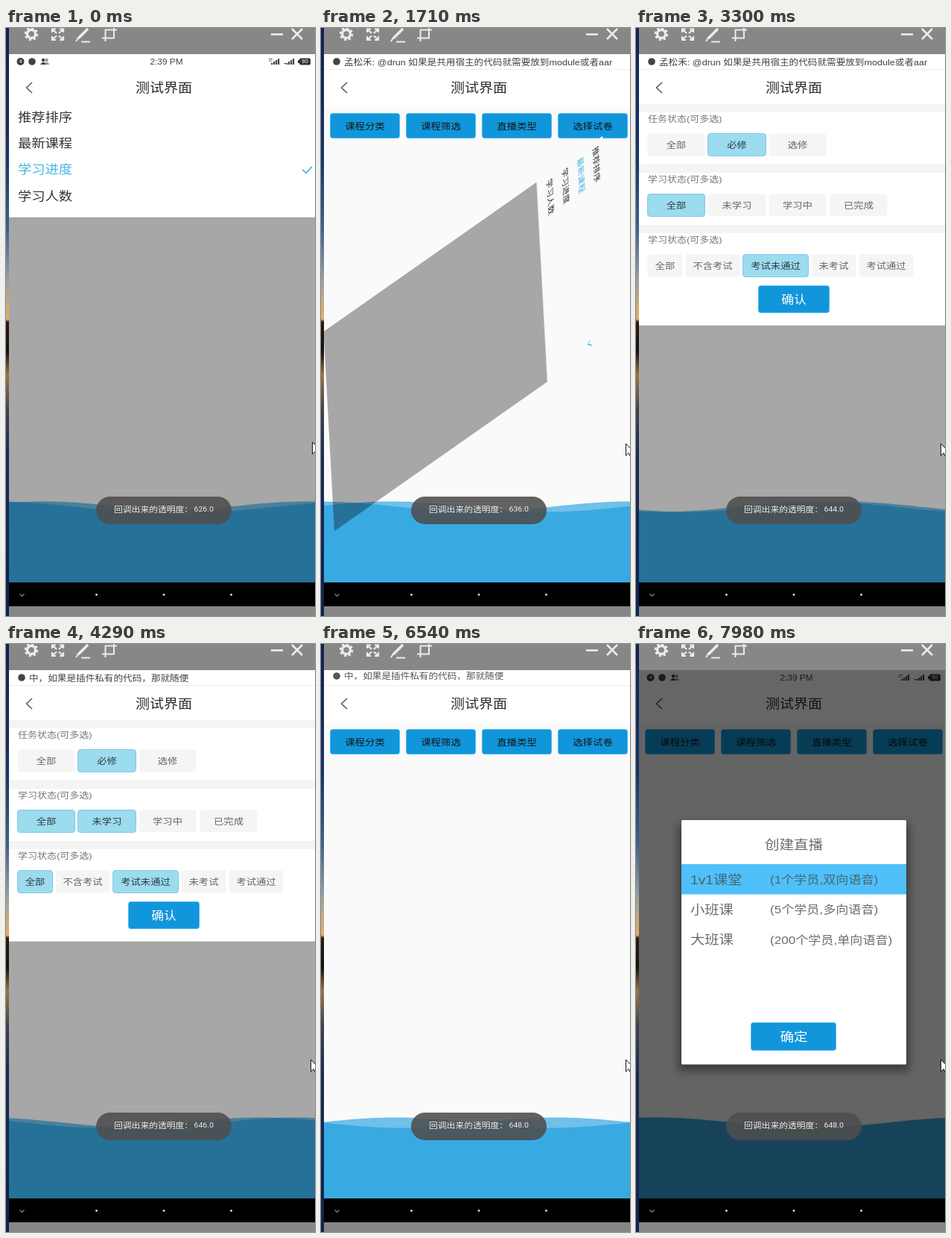
An HTML page for the animation above (8 s loop, 415 px wide and 788 px high).

```html
<!DOCTYPE html>
<html lang="zh">
<head>
<meta charset="utf-8">
<title>测试界面</title>
<style>
html, body { margin: 0; width: 100%; height: 100%; overflow: hidden; background: #878787; }
svg { display: block; width: 415px; height: 788px; }
text { font-family: "Liberation Sans", "Noto Sans CJK SC", "Noto Sans CJK", sans-serif; white-space: pre; }
</style>
</head>
<body>
<svg id="stage" viewBox="0 0 415 788">
  <defs>
    <linearGradient id="wall" x1="0" y1="0" x2="0" y2="1">
      <stop offset="0" stop-color="#0e2350"/>
      <stop offset=".22" stop-color="#17336b"/>
      <stop offset=".34" stop-color="#3f608f"/>
      <stop offset=".43" stop-color="#98a0a4"/>
      <stop offset=".495" stop-color="#e8ae62"/>
      <stop offset=".5" stop-color="#2a1c14"/>
      <stop offset=".55" stop-color="#15100f"/>
      <stop offset=".59" stop-color="#9a7640"/>
      <stop offset=".65" stop-color="#3f4152"/>
      <stop offset=".73" stop-color="#182b55"/>
      <stop offset="1" stop-color="#0e2350"/>
    </linearGradient>
    <clipPath id="screen"><rect x="4" y="35" width="411" height="708"/></clipPath>
    <clipPath id="bar"><rect x="4" y="35" width="411" height="20"/></clipPath>
    <filter id="soft" x="-20%" y="-20%" width="140%" height="140%"><feGaussianBlur stdDeviation="6"/></filter>
  </defs>
</svg>
<script>
const stage = document.getElementById('stage');
const BLUE = '#1296db';
const SQUASH = 0.88; // the mirrored screen is shown a little flattened

function add(parent, tag, attrs, label) {
  const node = document.createElementNS('http://www.w3.org/2000/svg', tag);
  for (const key in attrs) node.setAttribute(key, attrs[key]);
  if (label !== undefined) node.textContent = label;
  parent.appendChild(node);
  return node;
}
const group = (parent, attrs = {}) => add(parent, 'g', attrs);
const rect = (parent, x, y, x2, y2, fill, more = {}) =>
  add(parent, 'rect', { x, y, width: x2 - x, height: y2 - y, fill, ...more });
const line = (parent, d, stroke, width, more = {}) =>
  add(parent, 'path', { d, fill: 'none', stroke, 'stroke-width': width, ...more });
const dot = (parent, cx, cy, r, fill) => add(parent, 'circle', { cx, cy, r, fill });
const button = (parent, x, y, x2, y2) =>
  rect(parent, x + 0.5, y + 0.5, x2 - 0.5, y2 - 0.5, BLUE, { rx: 3, stroke: '#4db8ee' });
// y is the middle of the line
const text = (parent, x, y, size, fill, label, anchor = 'start') =>
  add(parent, 'text', {
    transform: `translate(${x} ${y + size * 0.365 * SQUASH}) scale(1 ${SQUASH})`,
    'font-size': size, fill, 'text-anchor': anchor
  }, label);

const clamp = v => Math.max(0, Math.min(1, v));
const span = (t, from, to) => clamp((t - from) / (to - from));
function along(table, t) {
  for (let i = 1; i < table.length; i++) {
    const [t0, a] = table[i - 1], [t1, b] = table[i];
    if (t <= t1) return a + (b - a) * (t - t0) / (t1 - t0);
  }
  return table[table.length - 1][1];
}
const show = (node, on) => node.setAttribute('display', on ? 'inline' : 'none');

// Window frame
rect(stage, 0, 0, 415, 788, '#878787');
rect(stage, 0, 0, 4, 788, 'url(#wall)');
const tools = group(stage, { stroke: '#ececec', fill: 'none' });
add(tools, 'circle', { cx: 34, cy: 8, r: 5.5, 'stroke-width': 3.4 });
add(tools, 'circle', { cx: 34, cy: 8, r: 8, 'stroke-width': 2.6, 'stroke-dasharray': '3.2 3.08' });
line(tools, 'M62 6V1.5H67M72 1.5H77V6M77 11V16H72M67 16H62V11M63 2.5L68 7M76 2.5L71 7M63 15L68 10.5M76 15L71 10.5', '#ececec', 2.2);
line(tools, 'M97 14L110 1', '#ececec', 3.6);
line(tools, 'M94 18L97 13M101 18.5H113', '#ececec', 2);
line(tools, 'M149 2.5H133.5V18M145 0V13.5H129', '#ececec', 2);
line(tools, 'M356 8.5H372', '#ececec', 2.6);
line(tools, 'M384 1L398 15M398 1L384 15', '#ececec', 2.6);

// Page
const screen = group(stage, { 'clip-path': 'url(#screen)' });
rect(screen, 4, 35, 415, 743, '#fafafa');
rect(screen, 4, 35, 415, 106, '#fff');

const bar = group(screen, { 'clip-path': 'url(#bar)' });
const icons = group(bar);
dot(icons, 19.5, 45, 5, '#3d3d3d');
text(icons, 19.5, 45, 7.5, '#fff', '4', 'middle');
dot(icons, 35, 45, 4.8, '#444');
for (const [x, c] of [[54.5, '#999'], [50, '#444']]) {
  dot(icons, x, 43, 2.2, c);
  add(icons, 'path', { d: `M${x - 4} 49Q${x} 42.5 ${x + 4} 49Z`, fill: c });
}
text(icons, 215.5, 45, 11.8, '#444', '2:39 PM', 'middle');
for (const x of [356, 376]) {
  for (let i = 0; i < 4; i++) rect(icons, x + i * 3, 47 - i * 2, x + i * 3 + 2.2, 49, '#444');
}
line(icons, 'M353 41.5H358M353 44H357M373 47.5H376', '#666', 1.2);
rect(icons, 394, 40.5, 409, 49.5, '#333', { rx: 2 });
rect(icons, 392, 43, 395, 47, '#333');
text(icons, 401.5, 45, 7.5, '#fff', '90', 'middle');

const ticker = [
  ['孟松禾: @drun 如果是共用宿主的代码就需要放到module或者aar', 960, 3780],
  ['中，如果是插件私有的代码，那就随便', 3780, 6510]
].map(([label, from, to]) => {
  const node = group(bar);
  dot(node, 21, 45, 4.8, '#444');
  text(node, 31, 45.5, 12.63, '#404040', label);
  return { node, from, to };
});
const barLine = line(screen, 'M4 55.5H415', '#ececec', 1);

line(screen, 'M35 73L27.5 80L35 87', '#555', 1.5);
text(screen, 212, 80, 19, '#2b2b2b', '测试界面', 'middle');
['课程分类', '课程筛选', '直播类型', '选择试卷'].forEach((label, i) => {
  const x = 12 + i * 102;
  button(screen, x, 114, x + 94, 148);
  text(screen, x + 47, 132, 13.4, '#10161a', label, 'middle');
});

// Both layers are see-through, so their overlap is the deep colour
const waves = [
  [[0, 50], [1710, 95], [2790, 190], [4290, 340], [5880, 487], [6540, 517], [7980, 446]],
  [[0, 405], [1710, 415], [2790, 218], [4290, 390], [5880, 343], [6540, 316], [7980, 440]]
].map(crest => ({ crest, node: add(screen, 'path', { fill: 'rgb(20,154,222)', 'fill-opacity': 0.6 }) }));

function waveShape(crest) {
  let d = 'M4 743';
  for (let x = 4; x <= 420; x += 8) {
    d += `L${x} ${(641.5 - 7 * Math.cos((x - crest) * 2 * Math.PI / 417)).toFixed(2)}`;
  }
  return d + 'V743Z';
}

function popup(bottom) {
  const node = group(screen);
  rect(node, 4, bottom, 421, 743, '#000', { 'fill-opacity': 0.333 });
  rect(node, 4, 102, 421, bottom, 'currentColor');
  line(node, `M4 ${bottom}H421`, '#999', 0.6);
  return node;
}
// A moving sheet takes the tone of the page
const setPaper = (node, moving) => node.setAttribute('color', moving ? '#fafafa' : '#fff');

// Sort list
const sort = popup(254);
const sortRows = ['推荐排序', '最新课程', '学习进度', '学习人数'].map((label, i) => {
  const y = 119 + i * 35.3;
  return {
    label: text(sort, 16, y, 18.3, '#333', label),
    tick: line(sort, `M398 ${y}L403 ${y + 5}L411 ${y - 4}`, '#45b4e3', 1.6)
  };
});

// Filter sheet: [label, left, right, selected from]
const filter = popup(399);
const chips = [];
[
  ['任务状态(可多选)', [['全部', 16, 92, 4800], ['必修', 97, 174, 0], ['选修', 179, 255]]],
  ['学习状态(可多选)', [['全部', 16, 92, 0], ['未学习', 97, 174, 3480], ['学习中', 179, 255], ['已完成', 261, 337]]],
  ['学习状态(可多选)', [['全部', 16, 62, 4020], ['不含考试', 67, 139, 5220], ['考试未通过', 144, 231, 0],
    ['未考试', 236, 295], ['考试通过', 300, 372]]]
].forEach(([title, row], i) => {
  const y = 102 + i * 81;
  rect(filter, 4, y, 421, y + 11, '#f4f4f4');
  text(filter, 16, y + 19.5, 13, '#777', title);
  for (const [label, x, x2, at = Infinity] of row) {
    const box = rect(filter, x - 0.5, y + 39.5, x2 + 0.5, y + 69.5, '#f5f5f5', { rx: 3.5 });
    const name = text(filter, (x + x2) / 2, y + 54.5, 13.3, '#666', label, 'middle');
    chips.push({ box, name, at });
  }
});
button(filter, 164, 345, 260, 382);
text(filter, 212, 363.5, 16.8, '#fff', '确认', 'middle');

// Dialog
const shade = rect(screen, 4, 35, 415, 743, '#000');
const dialog = group(screen);
rect(dialog, 57, 241, 367, 572, '#000', { 'fill-opacity': 0.42, filter: 'url(#soft)' });
rect(dialog, 61, 236, 363, 563.5, '#fff', { rx: 1.5 });
text(dialog, 212, 269, 19.5, '#6c6c6c', '创建直播', 'middle');
rect(dialog, 61, 295, 363, 335.5, '#4fc0f9');
[
  ['1v1课堂', '(1个学员,双向语音)'],
  ['小班课', '(5个学员,多向语音)'],
  ['大班课', '(200个学员,单向语音)']
].forEach(([name, note], i) => {
  const y = 315.5 + i * 40.3, fill = i ? '#6c6c6c' : '#466575';
  text(dialog, 73, y, 19.3, fill, name);
  text(dialog, 180, y, 17.1, fill, note);
});
button(dialog, 154, 507, 269, 545);
text(dialog, 212, 526, 18.6, '#fff', '确定', 'middle');

// Toast
rect(stage, 121, 628, 303, 665, '#4e4e4e', { rx: 18.5, 'fill-opacity': 0.88 });
text(stage, 145, 645, 11.8, '#eee', '回调出来的透明度：');
const count = text(stage, 252.5, 645, 10.5, '#eee', '');
count.style.fontFamily = 'Roboto, sans-serif';
const counts = [[0, 626], [1710, 636], [2790, 643], [4000, 646], [6060, 646], [6400, 648], [8000, 648]];

// Navigation bar
rect(stage, 4, 743, 415, 775, '#000');
line(stage, 'M18.5 758.5L21.5 761.5L24.5 758.5', '#888', 1.2);
for (const x of [121.5, 212, 302.5]) dot(stage, x, 759.5, 1.4, '#ddd');

const pointer = add(stage, 'path', {
  d: 'M0 0V16L3.7 12.5L6.2 18L8.5 17L6 11.5H11Z', fill: '#fff', stroke: '#111', 'stroke-width': 1
});

function drawBar(t) {
  icons.setAttribute('opacity', t < 4000 ? 1 - span(t, 960, 1200) : span(t, 6570, 6840));
  for (const { node, from, to } of ticker) {
    const enter = span(t, from, from + 300), leave = span(t, to, to + 300);
    show(node, enter > 0 && leave < 1);
    node.setAttribute('transform', `translate(0 ${20 * (1 - enter - leave)})`);
    node.setAttribute('opacity', enter * (1 - leave));
  }
  show(barLine, t > 960 && t < 6810);
}

function drawSort(t) {
  const p = span(t, 1470, 2130);
  show(sort, p < 0.92);
  setPaper(sort, p > 0);
  const sx = Math.max(0, 1 - 0.98 * p), sy = Math.max(0, 1 - 1.08 * p);
  sort.setAttribute('transform',
    `translate(${212.5 - 42 * p} ${424 - 38 * p}) rotate(${238 * p}) ` +
    `skewX(${35 * Math.sin(Math.PI * p)}) scale(${sx} ${sy}) translate(-212.5 -424)`);
  const chosen = t < 1320 ? 2 : 1;
  sortRows.forEach(({ label, tick }, i) => {
    label.setAttribute('fill', i === chosen ? '#45b4e3' : '#333');
    show(tick, i === chosen);
  });
}

function drawFilter(t) {
  const size = span(t, 2550, 2910) - span(t, 6060, 6400);
  show(filter, size > 0);
  setPaper(filter, size < 1);
  filter.setAttribute('transform', `translate(212.5 113) scale(${size}) translate(-212.5 -113)`);
  for (const { box, name, at } of chips) {
    const on = t >= at;
    box.setAttribute('fill', on ? '#9bdcee' : '#f5f5f5');
    box.setAttribute('stroke', on ? '#86c4ee' : 'none');
    name.setAttribute('fill', on ? '#2e3a40' : '#666');
  }
}

function drawDialog(t) {
  const p = span(t, 7080, 7320), size = 0.9 + 0.1 * p;
  shade.setAttribute('fill-opacity', 0.6 * p);
  dialog.setAttribute('opacity', p);
  dialog.setAttribute('transform', `translate(212 400) scale(${size}) translate(-212 -400)`);
}

function draw(t) {
  drawBar(t);
  for (const { node, crest } of waves) node.setAttribute('d', waveShape(along(crest, t)));
  drawSort(t);
  drawFilter(t);
  drawDialog(t);
  count.textContent = Math.floor(along(counts, t) + 0.01) + '.0';
  pointer.setAttribute('transform', t < 1080 ? 'translate(411.5 555)' : 'translate(409.5 557)');
}

const start = performance.now();
function tick() {
  draw((performance.now() - start) % 8000);
  requestAnimationFrame(tick);
}
tick();
</script>
</body>
</html>
```
